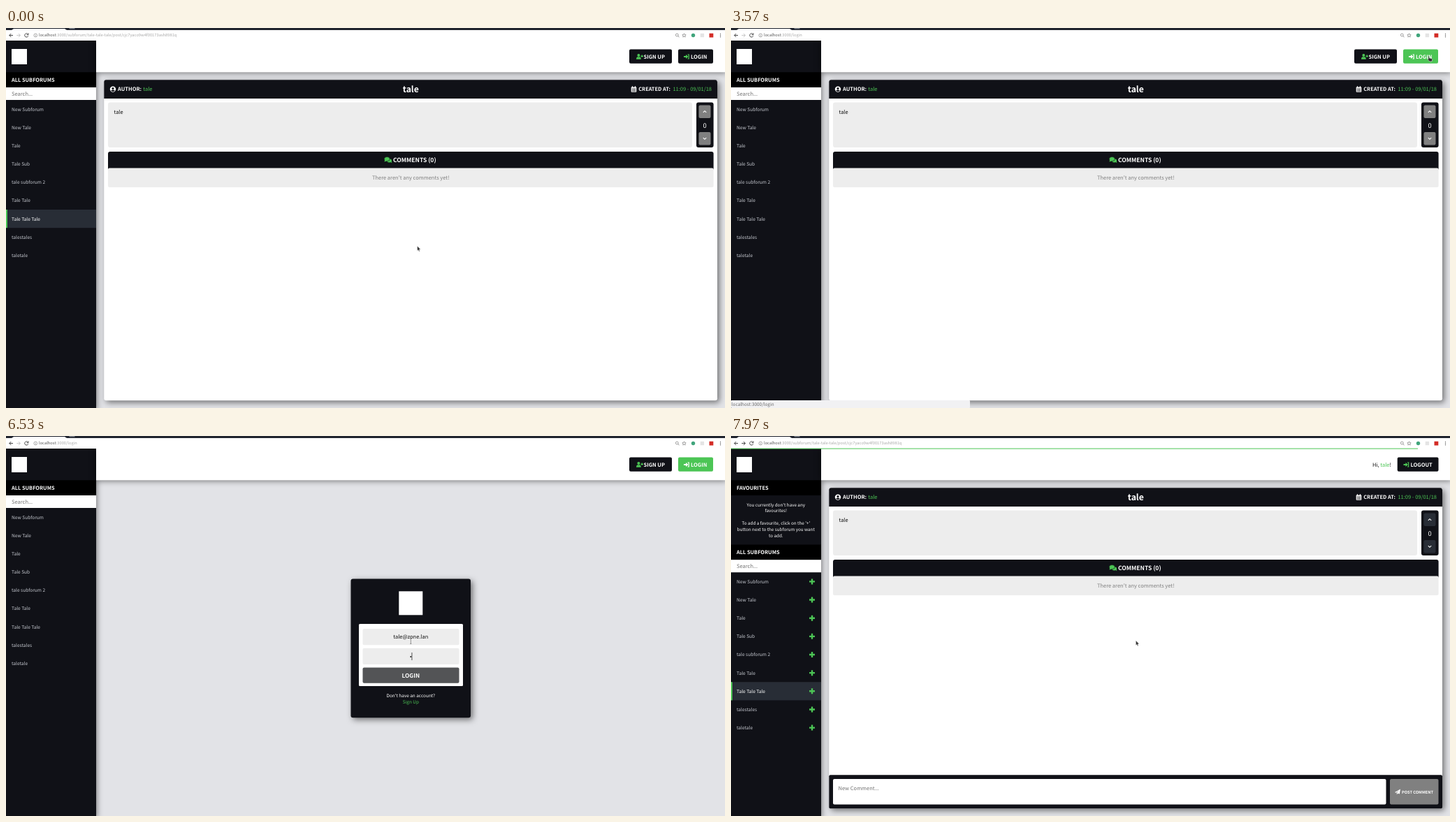
An HTML page for the animation above (8000 ms loop, 1029 px wide and 544 px high).

```html
<!DOCTYPE html>
<html lang="en">
<head>
<meta charset="utf-8">
<title>Forum login</title>
<style>
  html, body { margin: 0; width: 100%; height: 100%; overflow: hidden; }
  svg { display: block; width: 100%; height: 100%; }
  text {
    font-family: "Noto Sans CJK JP", "Noto Sans CJK SC", "Noto Sans CJK", sans-serif;
    text-rendering: geometricPrecision;
    white-space: pre;
  }
  .card { filter: drop-shadow(3px 3px 4px rgba(0, 0, 0, .5)); }
  .edge { filter: drop-shadow(0 0 5px rgba(0, 0, 0, .6)); }
</style>
</head>
<body>
<svg id="stage" viewBox="0 0 1029 544"></svg>
<script>
const DARK = '#101117', GREEN = '#4cc555', PALE = '#ededed', GREY = '#808080', BACK = '#e2e3e7';
const CENTER = 579.3, ROW = 26.15;
const stage = document.getElementById('stage');

// Markup helpers
const rect = (x, y, w, h, fill, r = 0, extra = '') =>
  `<rect x="${x}" y="${y}" width="${w}" height="${h}" rx="${r}" fill="${fill}" ${extra}/>`;
const text = (x, y, str, size, fill = '#fff', weight = 400, anchor = 'start', id = '') =>
  `<text x="${x}" y="${y}" font-size="${size}" fill="${fill}" font-weight="${weight}" text-anchor="${anchor}" id="${id}">${str}</text>`;
const middle = (y, str, size, fill, weight, id) => text(CENTER, y, str, size, fill, weight, 'middle', id);
const fillPath = (d, fill, extra = '') => `<path d="${d}" fill="${fill}" ${extra}/>`;
const line = (d, color, width = 1, extra = '') =>
  `<path d="${d}" fill="none" stroke="${color}" stroke-width="${width}" ${extra}/>`;
const dot = (x, y, r, fill, extra = '') => `<circle cx="${x}" cy="${y}" r="${r}" fill="${fill}" ${extra}/>`;
const group = (id, body, extra = '') => `<g id="${id}" ${extra}>${body}</g>`;
const at = (x, y, body) => `<g transform="translate(${x} ${y})">${body}</g>`;

// Icons, each centred on its own origin
const doorIcon = color =>
  fillPath('M-4-1H-1V-3L2.5 0L-1 3V1H-4Z', color) + line('M1.5-3H3.2V3H1.5', color, 1.2);
const userAddIcon =
  dot(-1.6, -2, 2, GREEN) + fillPath('M-5 3.8Q-5 0-1.6.4Q1.8 0 1.8 3.8Z', GREEN) +
  line('M1.4-.7H5M3.2-2.5V1.1', GREEN, 1.3);
const authorIcon =
  dot(0, 0, 4.2, '#fff') + dot(0, -1.1, 1.6, DARK) + fillPath('M-2.9 2.2Q0-.6 2.9 2.2Q0 4.6-2.9 2.2Z', DARK);
const calendarIcon =
  rect(-3.8, -3.2, 7.6, 7.4, '#fff', .7) + line('M-2-4.4V-2M2-4.4V-2', '#fff', 1.2) +
  line('M-3-.9H3M-3 1H3M-3 2.8H3M-1.2-.9V3.4M1.2-.9V3.4', DARK, .5);
const bubblesIcon =
  '<ellipse cx="1.9" cy="1.2" rx="3.4" ry="2.6" fill="#4cc555"/>' + fillPath('M3 3L5.6 4.6L4.8 1.5Z', GREEN) +
  '<ellipse cx="-1.4" cy="-1" rx="4" ry="3.1" fill="#4cc555" stroke="#101117" stroke-width=".6"/>' +
  fillPath('M-4.4 0L-5.2 3L-1.6 1.7Z', GREEN);
const planeIcon = fillPath('M-4 .6L4-4L2.8 3L.3 2L-1.2 3.8V1.4L2.4-2L-2.2 1.2Z', '#fff');
const plusIcon = line('M-4 0H4M0-4V4', GREEN, 2.4);

function browserBar() {
  const ink = '#4a4a4a', pale = '#c8c8c8';
  return rect(0, 0, 1029, 18, '#fff') + rect(0, 0, 1029, 3, '#20242e') +
    fillPath('M8 3L11 1H84L87 3Z', '#f4f4f4') + fillPath('M90 0H98L99 1.5H91Z', '#777c86') +
    line('M10 10.5H4.8M7.3 8L4.8 10.5L7.3 13', ink) +
    line('M15.3 10.5H20.5M18 8L20.5 10.5L18 13', pale, 1, 'id="forward"') +
    line('M31.5 9A2.6 2.6 0 1 0 31.8 11.3M32 7.4V9.7H29.7', ink) +
    dot(42.3, 10.5, 2.4, 'none', 'stroke="#777" stroke-width=".6"') + line('M42.3 10V12M42.3 8.8V9.4', '#777', .6) +
    text(47, 12.4, '<tspan fill="#555">localhost</tspan><tspan id="path"></tspan>', 5.75, '#aaa') +
    dot(960.3, 10, 1.9, 'none', 'stroke="#777" stroke-width=".7"') + line('M961.7 11.4L963.4 13', '#777', .9) +
    line('M970.5 7.8L971.3 9.6L973.2 9.8L971.8 11.1L972.2 13L970.5 12L968.8 13L969.2 11.1L967.8 9.8L969.7 9.6Z', '#666', .6) +
    dot(983.5, 10.5, 2.7, '#41a57c') + rect(993.7, 7.8, 5.4, 5.4, '#e4e4e4') + rect(1006.5, 7.7, 5.8, 5.8, '#d32d27') +
    [8.3, 10.5, 12.7].map(y => dot(1022.5, y, .65, '#555')).join('');
}

function subforums() {
  const names = ['New Subforum', 'New Tale', 'Tale', 'Tale Sub', 'tale subforum 2',
    'Tale Tale', 'Tale Tale Tale', 'talestales', 'taletale'];
  const rows = names.map((name, i) => {
    const y = 116.2 + i * ROW;
    return text(8, y + 2.4, name, 6.6, '#c6c9d0', 500, 'start', i === 6 ? 'current' : '') +
      `<g class="member">${at(116, y, plusIcon)}</g>`;
  });
  return rect(0, 63.3, 129, 21.7, '#000') + text(8, 77, 'ALL SUBFORUMS', 7.4, '#fff', 700) +
    rect(0, 85, 129, 18, '#fff') + text(8, 96.8, 'Search...', 7.5, '#757575') +
    group('selected', rect(0, 260, 129, ROW, '#282d36') + rect(0, 260, 2, ROW, GREEN)) + rows.join('');
}

function sidebar() {
  const note = [[100.5, "You currently don't have any"], [109.3, 'favourites!'],
    [127, "To add a favourite, click on the '+'"], [135.8, 'button next to the subforum you want'], [144.6, 'to add.']];
  return rect(0, 18, 129, 530, DARK, 0, 'class="edge"') + rect(8, 30, 22, 22, '#fff') +
    `<g class="member">${rect(0, 63.3, 129, 21.7, '#000')}${text(8, 77, 'FAVOURITES', 7.4, '#fff', 700)}
     ${note.map(([y, s]) => text(64.3, y, s, 6.3, '#fff', 400, 'middle')).join('')}</g>` +
    group('list', subforums());
}

function header() {
  return rect(129, 18, 902, 45.3, '#fff', 0, 'class="edge"') +
    group('guest',
      rect(892, 30.5, 61, 20.3, DARK, 2) + at(907, 41, userAddIcon) + text(912.5, 43.7, 'SIGN UP', 7.5, '#fff', 700) +
      rect(962, 30.5, 50, 20.3, DARK, 2, 'id="loginLink"') +
      group('doorGreen', at(974, 41, doorIcon(GREEN))) + group('doorWhite', at(974, 41, doorIcon('#fff'))) +
      text(980, 43.7, 'LOGIN', 7.5, '#fff', 700)) +
    `<g class="member">${text(918, 43.6, `Hi, <tspan fill="${GREEN}">tale</tspan>!`, 7.5, '#111')}
     ${rect(953.7, 30.5, 58.8, 20.3, DARK, 2)}${at(966.5, 41, doorIcon(GREEN))}
     ${text(972.5, 43.7, 'LOGOUT', 7.5, '#fff', 700)}</g>`;
}

function postPage() {
  const vote = (y, tip) => rect(991.5, y - 9.2, 17, 18.4, GREY, 2, 'class="vote"') +
    line(`M997.8 ${y + tip}L1000 ${y - tip}L1002.2 ${y + tip}`, '#fff', 1.1);
  return rect(140.3, 74.3, 877.7, 459, '#fff', 3, 'class="card"') +
    fillPath('M140.3 101V77.3Q140.3 74.3 143.3 74.3H1015Q1018 74.3 1018 77.3V101Z', DARK) +
    at(153, 87.6, authorIcon) + text(160, 90.3, 'AUTHOR:', 7.5, '#fff', 700) + text(196.3, 90.3, 'tale', 7.5, GREEN) +
    middle(92, 'tale', 12.2, '#fff', 700) +
    at(898.5, 87.6, calendarIcon) + text(951, 90.3, 'CREATED AT:', 7.4, '#fff', 700, 'end') +
    text(1010, 90.3, '11:09 - 09/01/18', 7.5, GREEN, 400, 'end') +
    rect(146, 106.5, 836, 64.5, PALE, 3) + text(154.5, 122.8, 'tale', 7.5, '#111') +
    rect(988, 106.5, 24.6, 64.5, DARK, 3) + vote(119.8, 1.1) + vote(158.2, -1.1) +
    text(1000, 142.7, '0', 9.3, '#fff', 400, 'middle') +
    rect(146, 177, 866.6, 27, DARK, 3) + rect(146, 200.4, 866.6, 27.6, PALE, 2) +
    at(546.7, 188.6, bubblesIcon) + text(554, 191.7, 'COMMENTS (0)', 8.5, '#fff', 700) +
    middle(217, "There aren't any comments yet!", 7.5, GREY) +
    `<g class="member">${rect(140.3, 485.3, 877.7, 48, DARK, 2)}${rect(146, 491, 791.5, 36.4, '#fff', 2)}
     ${text(153.5, 507, 'New Comment...', 7.5, '#757575')}${rect(943, 491, 69.5, 36.4, GREY, 2)}
     ${at(954, 509.5, planeIcon)}${text(960, 511.6, 'POST COMMENT', 5.65, '#fff', 700)}</g>`;
}

function loginPage() {
  return rect(493.5, 204.6, 171.5, 198.6, DARK, 3, 'class="card"') + rect(CENTER - 17, 222.3, 34, 34, '#fff') +
    rect(505, 269, 149, 89, '#fff', 1.5) +
    rect(510.5, 276, 138, 23.3, PALE, 2) + rect(510.5, 303.8, 138, 23.3, PALE, 2) +
    rect(510.5, 331.4, 138, 22.4, GREY, 2, 'id="submit"') + middle(346, 'LOGIN', 8.2, '#fff', 700) +
    middle(290.2, '', 7.5, '#111', 400, 'email') + middle(318, 'Password', 7.5, '#757575', 400, 'passwordHint') +
    group('dots', '') + rect(0, 0, .7, 11, '#111', 0, 'id="caret"') +
    middle(373.8, "Don't have an account?", 6.45) + middle(382.8, 'Sign Up', 6.45, GREEN);
}

function loggedPage() {
  return rect(CENTER - 17, 270.3, 34, 34, '#000') + middle(324.5, 'You are already logged in!', 8.4, '#111', 700) +
    middle(340.2, 'If you want to login to a different account, please logout first.', 8.4, '#111', 700);
}

const outline = 'stroke="#fff" stroke-width=".5"';
const pointers =
  group('arrow', fillPath('M0 0V7L1.5 5.7L2.6 8L3.8 7.5L2.8 5.2L4.9 5Z', '#333', outline)) +
  group('hand', fillPath('M0 .6Q.8-.5 1.5.6V3L5 3.8Q6.2 4.3 5.7 6L5 8H1.8L-1 5.2Q-.9 4.2 0 4.5Z', '#333', outline)) +
  group('beam', line('M-1 0H1M0 0V7.4M-1 7.4H1', '#555', .6));

stage.innerHTML = rect(0, 0, 1029, 544, BACK) + group('post', postPage()) + group('login', loginPage()) +
  group('logged', loggedPage()) + sidebar() + header() + browserBar() +
  rect(0, 17.6, 0, 1, GREEN, 0, 'id="progress"') +
  group('status', rect(0, 533, 342, 11, '#f1f1f3', 1) + text(.8, 541, 'localhost:3000/login', 6.4, '#666')) +
  group('pointer', pointers);

const el = id => document.getElementById(id);
const show = (node, on) => node.style.display = on ? '' : 'none';
const members = document.querySelectorAll('.member'), votes = document.querySelectorAll('.vote');
const clamp = v => Math.max(0, Math.min(1, v));

// Pointer stops: time, x, y
const stops = [[0, 588.5, 312], [270, 588.5, 312], [480, 613, 255], [680, 560, 186], [880, 507, 215], [1080, 535, 233],
  [1260, 485, 228], [1420, 560, 198], [1570, 645, 205], [1680, 656, 220], [1830, 570, 237], [1930, 515, 240],
  [2060, 470, 225], [2270, 620, 209], [2470, 724, 240], [2670, 724, 240], [2960, 850, 150], [3250, 978, 54],
  [3470, 998, 40], [3580, 998, 40], [3850, 850, 135], [4120, 650, 265], [4330, 579.3, 290], [4500, 579.3, 290], [8000, 579.3, 290]];

function pointerAt(t) {
  const i = Math.max(0, stops.findIndex(s => s[0] > t) - 1);
  const a = stops[i], b = stops[i + 1], u = (t - a[0]) / (b[0] - a[0]);
  if (a[1] === b[1] && a[2] === b[2]) return [a[1], a[2]];
  const before = stops[i - 1] || a, after = stops[i + 2] || b;
  return [1, 2].map(k => {
    const slopeIn = (b[k] - before[k]) / (b[0] - before[0]) * (b[0] - a[0]);
    const slopeOut = (after[k] - a[k]) / (after[0] - a[0]) * (b[0] - a[0]);
    return a[k] * (1 + 2 * u) * (1 - u) ** 2 + slopeIn * u * (1 - u) ** 2 +
      b[k] * u * u * (3 - 2 * u) + slopeOut * u * u * (u - 1);
  });
}

const typed = (t, start, step, max) => t < start ? 0 : Math.min(max, 1 + Math.floor((t - start) / step));

function drawForm(t) {
  const waiting = t < 4400, onPassword = t >= 6230;
  const letters = typed(t, 4830, 66, 4) + typed(t, 5300, 83, 9);
  const count = typed(t, 6470, 110, 4);
  const email = el('email');
  email.textContent = waiting ? 'Email Address' : 'tale@zone.lan'.slice(0, letters);
  email.setAttribute('fill', waiting ? '#757575' : '#111');
  show(el('passwordHint'), !onPassword);
  el('dots').innerHTML = Array.from({ length: count }, (_, i) =>
    dot(CENTER + (i - (count - 1) / 2) * 2.6, 316, .95, '#111')).join('');
  const width = onPassword ? count * 2.6 : letters ? email.getComputedTextLength() : 0;
  show(el('caret'), !waiting && t < 7300);
  el('caret').setAttribute('x', CENTER + width / 2);
  el('caret').setAttribute('y', onPassword ? 310 : 282.5);
  const fade = 1 - (1 - clamp((t - 6470) / 270)) ** 2;
  const mix = (from, to) => Math.round(from + (to - from) * fade);
  el('submit').setAttribute('fill', `rgb(${mix(128, 16)},${mix(128, 17)},${mix(128, 23)})`);
}

function draw(t) {
  const member = t >= 7800, atPost = t < 3530 || t >= 7860;
  const page = t < 3600 || t >= 7930 ? 'post' : member ? 'logged' : 'login';
  for (const name of ['post', 'login', 'logged']) show(el(name), name === page);
  members.forEach(node => show(node, member));
  votes.forEach(node => node.setAttribute('fill', member ? '#282d36' : GREY));
  show(el('guest'), !member);
  el('list').setAttribute('transform', `translate(0 ${member ? 92.2 : 0})`);
  show(el('selected'), atPost);
  el('current').setAttribute('fill', atPost ? '#fff' : '#c6c9d0');
  el('path').textContent = ':3000/' + (atPost ? 'subforum/tale-tale-tale/post/cjc7yaco9w4f00173ash8981q' : 'login');
  el('forward').setAttribute('stroke', member ? '#4a4a4a' : '#c8c8c8');
  el('progress').setAttribute('width', t < 7890 ? 0 : Math.min(983, (t - 7890) * 12.3));

  const [x, y] = pointerAt(t);
  const hover = !member && x > 962 && y > 30 && y < 51;
  const green = hover || !atPost;
  el('loginLink').setAttribute('fill', green ? GREEN : DARK);
  show(el('doorGreen'), !green);
  show(el('doorWhite'), green);
  show(el('status'), hover);
  const beam = page === 'login' && x > 510 && x < 649 && y > 276;
  show(el('arrow'), !hover && !beam);
  show(el('hand'), hover);
  show(el('beam'), beam);
  el('pointer').setAttribute('transform', `translate(${x} ${member ? y + 2.7 : y})`);
  if (page === 'login') drawForm(t);
}

function tick(now) {
  draw(now % 8000);
  requestAnimationFrame(tick);
}
draw(0);
requestAnimationFrame(tick);
</script>
</body>
</html>
```
